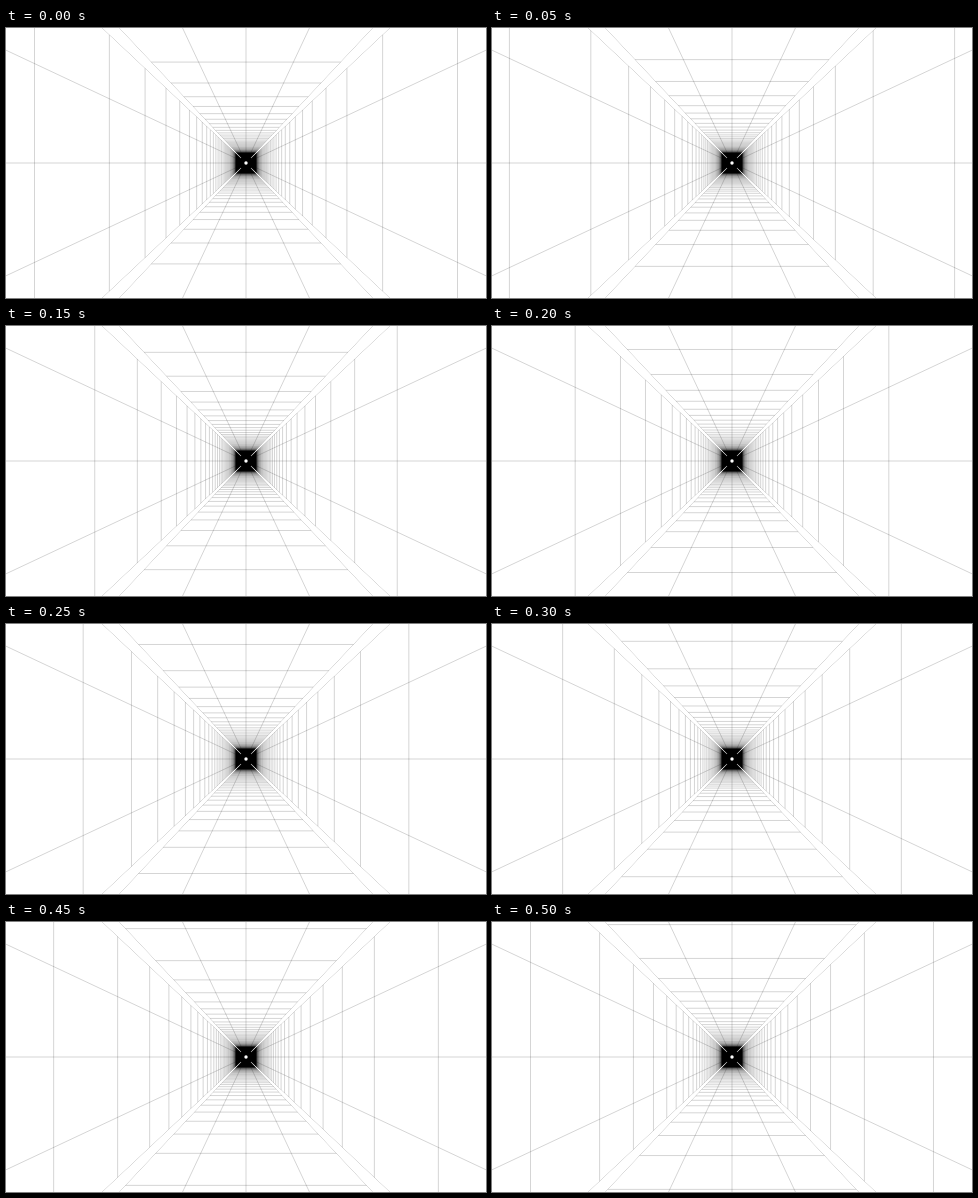
Animation of 480 by 270 pixels, one loop 550 ms. Source, as an HTML page with a canvas:

```html
<!DOCTYPE html>
<html lang="en">
<head>
<meta charset="utf-8">
<title>Grid tunnel</title>
<style>
  html, body { margin: 0; height: 100%; overflow: hidden; background: #fff; }
  canvas { display: block; }
</style>
</head>
<body>
<canvas id="stage" width="480" height="270"></canvas>
<script>
const ctx = document.getElementById('stage').getContext('2d');
const LOOP = 550, STEP = 50;
const FOCAL = 386;      // wall distance from the centre = FOCAL / depth
const FIRST = 0.825;    // depth of the nearest ring at the loop start
const EDGE = 0.94;      // half-width of a panel relative to its distance
const FAR = 9, NEAR = 300;
const LINE = 0.17, BORDER = 0.26;

const glow = ctx.createLinearGradient(0, 0, 16, 0);
[[0, 1], [10, 1], [11.2, 0.4], [13, 0.1], [16, 0]].forEach(([d, a]) =>
  glow.addColorStop(d / 16, `rgba(0,0,0,${a})`));

function line(x1, y1, x2, y2, alpha) {
  ctx.strokeStyle = `rgba(0,0,0,${alpha})`;
  ctx.beginPath();
  ctx.moveTo(x1, y1);
  ctx.lineTo(x2, y2);
  ctx.stroke();
}

// One wall, drawn to the right of the centre.
function panel(phase) {
  ctx.beginPath();
  ctx.moveTo(0, 0);
  ctx.lineTo(NEAR, -NEAR * EDGE);
  ctx.lineTo(NEAR, NEAR * EDGE);
  ctx.clip();

  for (let z = FIRST + 1 - phase; z < FOCAL / FAR; z++) {
    const d = FOCAL / z;
    if (d < NEAR) line(d, -d * EDGE, d, d * EDGE, LINE);
  }
  for (let i = -2; i <= 2; i++) {
    const slope = EDGE * i / 2;
    line(0, 0, NEAR, NEAR * slope, Math.abs(i) === 2 ? BORDER : LINE);
  }
  ctx.fillStyle = glow;
  ctx.fillRect(0, -16, 16, 32);
}

function draw(now) {
  const t = Math.floor((now % LOOP) / STEP) * STEP;
  ctx.fillStyle = '#fff';
  ctx.fillRect(0, 0, 480, 270);
  for (let side = 0; side < 4; side++) {
    ctx.save();
    ctx.translate(240, 135);
    ctx.rotate(side * Math.PI / 2);
    panel(t / LOOP);
    ctx.restore();
  }
  // The seams vanish in the dark before the light at the end.
  ctx.fillStyle = '#000';
  ctx.fillRect(235, 130, 10, 10);
  ctx.fillStyle = '#fff';
  ctx.beginPath();
  ctx.arc(240, 135, 1.7, 0, Math.PI * 2);
  ctx.fill();
}

function tick() {
  draw(performance.now());
  requestAnimationFrame(tick);
}
tick();
</script>
</body>
</html>
```
